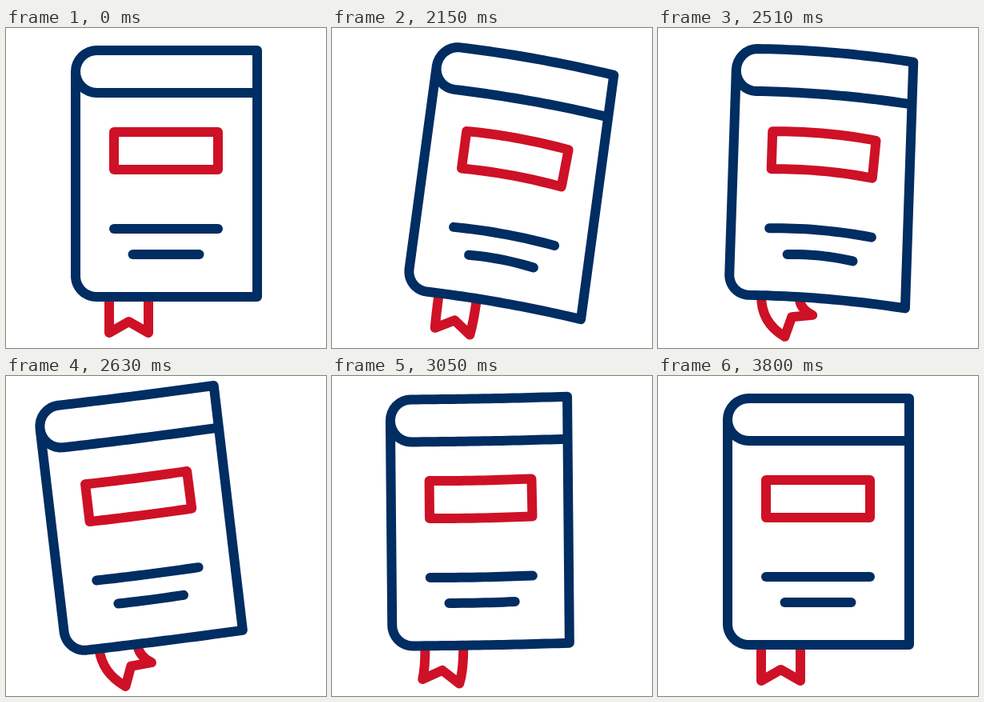
Write an HTML page with a canvas that moves like this. It is 400 px wide and 400 px high and loops after 3830 ms.

```html
<!DOCTYPE html>
<html>
<head>
<meta charset="utf-8">
<title>Swinging book</title>
<style>
html, body { margin: 0; width: 100%; height: 100%; overflow: hidden; background: #fff; }
canvas { display: block; }
</style>
</head>
<body>
<canvas id="stage" width="400" height="400"></canvas>
<script>
const ctx = document.getElementById('stage').getContext('2d');
const NAVY = '#002d62', RED = '#ce1126';
const LOOP = 3830, START = 2030, STEP = 30;
const PIVOT = { x: 159.5, y: 377 };
const BOOK = { left: 87, width: 227 };
const rad = deg => deg * Math.PI / 180;

// Eases from rest through each [time, extreme] and back to rest
function swing(t, ...extremes) {
  let [from, value] = [1980, 0];
  for (const [to, next] of [...extremes, [3680, 0]]) {
    if (t < to) return value + (next - value) * (1 - Math.cos(Math.PI * (t - from) / (to - from))) / 2;
    [from, value] = [to, next];
  }
  return 0;
}

// A single smooth rise and fall between 0 and 1
const hump = (t, from, length) =>
  t > from && t < from + length ? Math.sin(Math.PI * (t - from) / length) ** 2 : 0;

function poseAt(time) {
  const t = time < START ? 0 : START + Math.floor((time - START) / STEP) * STEP;
  if (!t) return { tilt: 0, bend: 0, sway: 0, dx: 0, dy: 0 };
  const slide = hump(t, 2500, 720);
  return {
    tilt: rad(swing(t, [2300, 14], [2700, -8.4], [3260, 3])),
    bend: swing(t, [2340, 17.5], [2820, -11.5], [3260, 6.5]),
    sway: swing(t, [2180, -12], [2600, 44], [2900, -18], [3260, 12]),
    dx: -24.5 * slide,
    dy: 2.5 * slide - 3 * hump(t, 3000, 520)
  };
}

// Bows a point along its shape's own width, then tilts it about the pivot.
// Tall shapes with a middle height also turn along the bow.
function warp(pose, [x, y], { left, width } = BOOK, middle = y) {
  const v = (x - left) / width, size = width / BOOK.width;
  const bow = pose.bend * Math.sqrt(size) * (1.8 * v * v - 0.8 * v);
  const shrink = 6 * Math.min(1, Math.abs(pose.bend) / 2) * size * size * v;
  const px = x - shrink - (y - middle) * pose.bend * v * 0.007 - PIVOT.x;
  const py = y + bow - PIVOT.y;
  const c = Math.cos(pose.tilt), s = Math.sin(pose.tilt);
  return [PIVOT.x + pose.dx + c * px - s * py, PIVOT.y + pose.dy + s * px + c * py];
}

function arc(cx, cy, r, from, to) {
  return Array.from({ length: 17 }, (_, i) => {
    const a = rad(from + (to - from) * i / 16);
    return [cx + r * Math.cos(a), cy + r * Math.sin(a)];
  });
}

function stroke(pose, points, color, middle) {
  const xs = points.map(p => p[0]), left = Math.min(...xs);
  const range = { left, width: Math.max(...xs) - left };
  ctx.strokeStyle = color;
  ctx.beginPath();
  ctx.moveTo(...warp(pose, points[0], range, middle));
  for (let i = 1; i < points.length; i++) {
    const [x0, y0] = points[i - 1], [x1, y1] = points[i];
    const n = Math.ceil(Math.hypot(x1 - x0, y1 - y0) / 8);
    for (let k = 1; k <= n; k++) {
      const p = [x0 + (x1 - x0) * k / n, y0 + (y1 - y0) * k / n];
      ctx.lineTo(...warp(pose, p, range, middle));
    }
  }
  ctx.stroke();
}

function drawRibbon(pose) {
  const { sway, tilt } = pose, a = rad(-sway);
  const left = warp(pose, [129, 336]), right = warp(pose, [178, 336]);
  const mx = (left[0] + right[0]) / 2 + sway * 0.6;
  const my = (left[1] + right[1]) / 2 + 45 - sway * sway * 0.0055;
  const half = 24.5 - Math.min(2.5, Math.abs(sway) * 0.2);
  const at = (x, y) => [mx + x * Math.cos(a) - y * Math.sin(a), my + x * Math.sin(a) + y * Math.cos(a)];
  const control = (top, tip) => {
    const d = 0.65 * (tip[1] - top[1]);
    return [top[0] - d * Math.sin(tilt), top[1] + d * Math.cos(tilt)];
  };
  const tipL = at(-half, 0), tipR = at(half, 0);
  ctx.strokeStyle = RED;
  ctx.lineCap = 'butt';
  ctx.beginPath();
  ctx.moveTo(...left);
  ctx.quadraticCurveTo(...control(left, tipL), ...tipL);
  ctx.lineTo(...at(0, -14));
  ctx.lineTo(...tipR);
  ctx.quadraticCurveTo(...control(right, tipR), ...right);
  ctx.stroke();
  ctx.lineCap = 'round';
}

function draw(t) {
  const pose = poseAt(t);
  ctx.fillStyle = '#fff';
  ctx.fillRect(0, 0, 400, 400);
  ctx.lineWidth = 12;
  ctx.lineJoin = ctx.lineCap = 'round';
  drawRibbon(pose);
  stroke(pose, [[314, 81], ...arc(113.5, 54.5, 26.5, 90, 270), [314, 28], [314, 336],
    ...arc(113, 310, 26, 90, 180), [87, 54.5]], NAVY);
  stroke(pose, [[135, 130], [265, 130], [265, 177], [135, 177], [135, 130]], RED, 153.5);
  stroke(pose, [[135, 251], [265, 251]], NAVY);
  stroke(pose, [[158.5, 283], [241.5, 283]], NAVY);
}

const begin = performance.now();
function frame() {
  draw((performance.now() - begin) % LOOP);
  requestAnimationFrame(frame);
}
frame();
</script>
</body>
</html>
```
